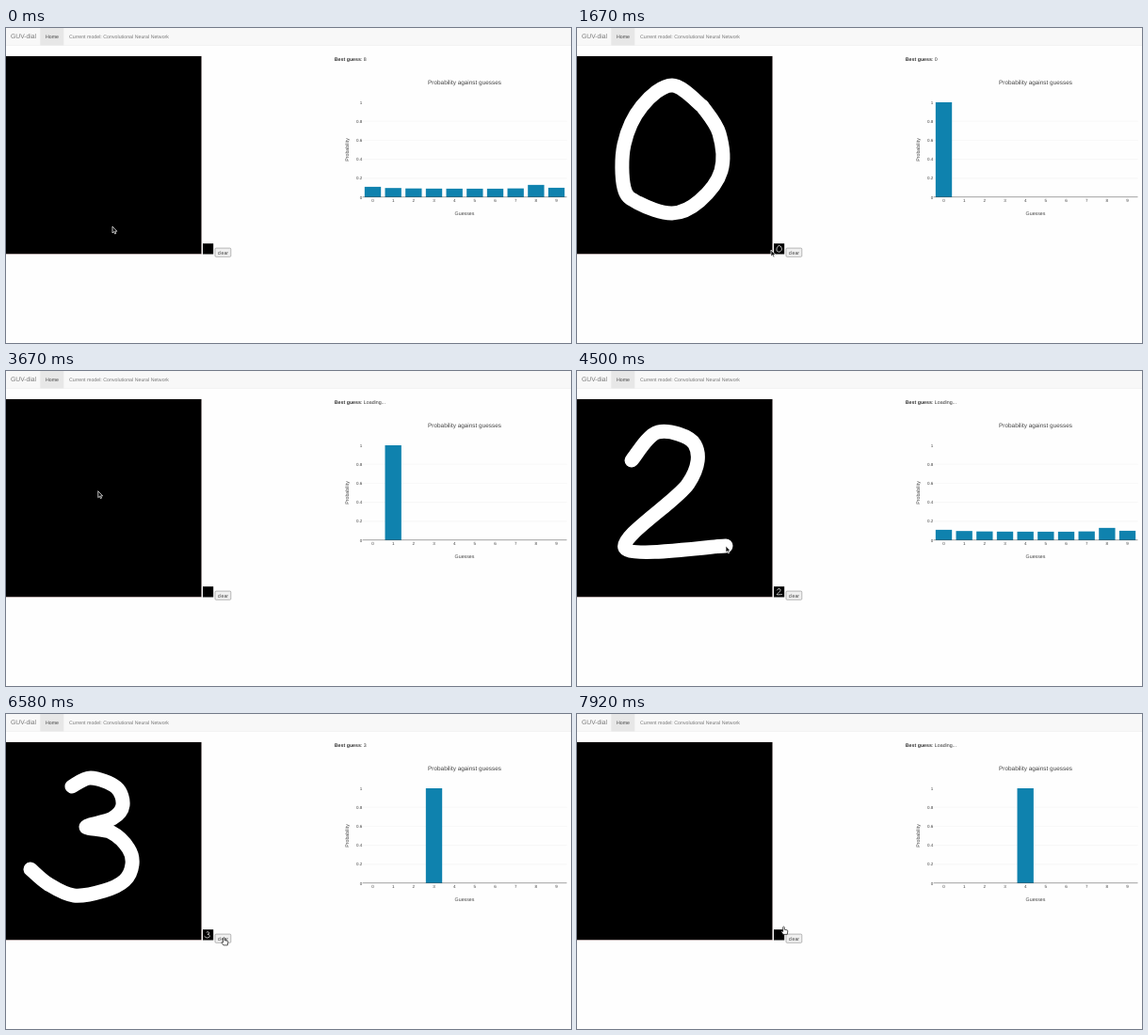
Write an HTML page that moves like this. It is 600x335 px and loops after 8000 ms.

```html
<!DOCTYPE html>
<html lang="en">
<head>
<meta charset="utf-8">
<title>Digit recogniser</title>
<style>
  html, body { margin: 0; width: 100%; height: 100%; overflow: hidden; background: #fefefe; }
  svg { display: block; width: 100vw; height: 100vh; }
  text { font-family: "Liberation Sans", Arial, sans-serif; font-size: 5.27px; fill: #444; text-rendering: geometricPrecision; }
  .nav { fill: #777; }
  .brand { font-size: 6.77px; }
  .guess { fill: #333; }
  .guess tspan { font-weight: bold; }
  .guess #answer { font-weight: normal; }
  .title { font-size: 6.4px; }
  .tick { font-size: 4.5px; }
  .mid { text-anchor: middle; }
  .end { text-anchor: end; }
  .bar { fill: #0f82ae; }
  .grid { stroke: #eee; stroke-width: .5; }
  #ink { fill: none; stroke: #fff; stroke-width: 15; stroke-linecap: round; stroke-linejoin: round; }
  #button { fill: #f0f0f0; stroke: #767676; stroke-width: .5; }
  #arrow { fill: #111; stroke: #fff; stroke-width: .7; }
  #hand { fill: #fff; stroke: #111; stroke-width: .7; stroke-linejoin: round; }
</style>
</head>
<body>
<svg viewBox="0 0 600 335" preserveAspectRatio="none">
  <rect width="600" height="18.5" fill="#f8f8f8"/>
  <rect y="18.5" width="600" height=".4" fill="#e7e7e7"/>
  <rect x="36.3" width="25" height="18.5" fill="#e7e7e7"/>
  <text class="nav brand" x="5" y="11.4">GUV-dial</text>
  <text x="42" y="11" fill="#555">Home</text>
  <text class="nav" x="67" y="11">Current model: Convolutional Neural Network</text>

  <rect y="29.7" width="207.8" height="211.2" fill="#cdbcbc"/>
  <rect y="30" width="207.4" height="210.1"/>
  <rect x="209" y="229.2" width="11.2" height="11.3"/>
  <g id="ink"></g>
  <use href="#ink" transform="translate(209.5 229.8) scale(.05) translate(3 -30)"/>
  <rect id="button" x="222" y="234.1" width="16.8" height="9.2" rx="1"/>
  <text class="mid" x="230.4" y="240.6" fill="#222">clear</text>

  <text class="guess" x="348.8" y="35.4"><tspan>Best guess</tspan>: <tspan id="answer"></tspan></text>
  <text class="mid title" x="487" y="60">Probability against guesses</text>
  <text class="mid" x="487" y="199.1">Guesses</text>
  <text class="mid" transform="translate(364.3 129.5) rotate(-90)">Probability</text>
  <g id="chart"></g>
  <rect x="378.7" y="179.6" width="216.8" height=".5" fill="#444"/>

  <g id="cursor">
    <path id="arrow" d="M0 0V7L1.6 5.6L2.7 8L3.8 7.5L2.8 5.2H4.9Z"/>
    <path id="hand" d="M-.8 .7Q0-.4 .8 .7V3.2L3.6 3.8Q4.4 4 4.3 5L3.8 8.4H-.6L-2.6 5.6Q-2.6 4.4-.8 5.4Z"/>
  </g>
</svg>
<script>
const FPS = 12, STEPS = 96;
const BASE = 180, UNIT = 101;
const BUTTON = { x: 231.5, y: 237.5 };

// Times are in steps of 1/12 s; strokes are key points of a smooth curve.
const digits = [
  { start: 4, end: 17, wipe: 24, strokes: ['133,83 101,61 69,83 50,124 50,170 65,186 101,197 130,184 153,152 151,112 133,83'] },
  { start: 31.2, end: 35, wipe: 40, strokes: ['121,61 98,195'] },
  { start: 45.8, end: 54, wipe: 60, strokes: ['58,95 86,65 125,78 118,120 51,188 158,186'] },
  { start: 63.6, end: 74, wipe: 80, strokes: ['70,77 90,68 117,78 124,97 113,111 85,120 112,126 130,143 134,160 126,177 104,188 72,193 45,181 26,165'] },
  { start: 82, end: 87, wipe: 93, strokes: ['102,62 51,148 152,146', '112,105 108,200'] }
];

const $ = id => document.getElementById(id);
function add(parent, tag, attrs, text) {
  const el = document.createElementNS('http://www.w3.org/2000/svg', tag);
  for (const key in attrs) el.setAttribute(key, attrs[key]);
  if (text !== undefined) el.textContent = text;
  return parent.appendChild(el);
}

// Catmull-Rom curve through the points
function smoothPath(points) {
  const pts = points.split(' ').map(p => p.split(',').map(Number));
  const at = i => pts[Math.max(0, Math.min(pts.length - 1, i))];
  const handle = (i, sign) => at(i).map((v, axis) => v + sign * (at(i + 1)[axis] - at(i - 1)[axis]) / 6);
  return pts.slice(1).reduce(
    (d, p, i) => `${d}C${handle(i, 1)} ${handle(i + 1, -1)} ${p}`, `M${pts[0]}`);
}

// An empty board is read as an unsure 8.
const idle = i => .09 + .02 * Math.exp(-i) + .042 * Math.exp(-2 * (i - 8.15) ** 2);
const sureOf = digit => i => +(i === digit);

const chart = $('chart');
for (let i = 0; i <= 5; i++) {
  const y = BASE - UNIT * i / 5;
  if (i > 0 && i < 5) add(chart, 'path', { class: 'grid', d: `M378.7 ${y}H595.5` });
  add(chart, 'text', { class: 'tick end', x: 378.2, y: y + 1.5 }, i / 5);
}
const bars = Array.from({ length: 10 }, (_, i) => {
  const x = 389.5 + 21.67 * i;
  add(chart, 'text', { class: 'tick mid', x, y: 184.7 }, i);
  return add(chart, 'rect', { class: 'bar', x: x - 8.67, width: 17.34 });
});

const events = [{ at: 0, text: '8', chance: idle }];
const stops = [{ at: 0, x: 113, y: 211 }, { at: 20, x: 206, y: 236 }, { at: STEPS - 1, x: 219.5, y: 226 }];
const strokes = [];
digits.forEach(({ start, end, wipe, strokes: curves }, k) => {
  const next = digits[k + 1]?.start ?? STEPS + 1;
  events.push(
    { at: end, text: 'Loading...', chance: idle },
    { at: end + 2, text: k, chance: sureOf(k) },
    { at: wipe, text: 'Loading...', chance: sureOf(k) },
    { at: next - 1, text: '8', chance: idle });
  curves.forEach((points, i) => {
    const slot = (end - start) / curves.length;
    const from = start + i * slot;
    const to = from + slot - (i < curves.length - 1 ? .5 : 0);
    const el = add($('ink'), 'path', { d: smoothPath(points), pathLength: 1 });
    const length = el.getTotalLength();
    const pen = p => {
      const { x, y } = el.getPointAtLength(p * length);
      return { x, y };
    };
    strokes.push({ el, from, to, wipe, pen });
    stops.push({ at: from, ...pen(0) }, { at: to, ...pen(1) });
  });
  stops.push({ at: wipe - 2, ...BUTTON }, { at: wipe, ...BUTTON });
});
stops.sort((a, b) => a.at - b.at);

function pointer(n) {
  const active = strokes.find(s => n >= s.from && n <= s.to);
  if (active) return active.pen((n - active.from) / (active.to - active.from));
  const next = stops.findIndex(s => s.at > n);
  if (next < 0) return stops.at(-1);
  const a = stops[next - 1], b = stops[next];
  const p = (n - a.at) / (b.at - a.at), e = p * p * (3 - 2 * p);
  return { x: a.x + (b.x - a.x) * e, y: a.y + (b.y - a.y) * e };
}

function draw(n) {
  const { text, chance } = events.findLast(e => e.at <= n);
  $('answer').textContent = text;
  bars.forEach((bar, i) => {
    const height = UNIT * chance(i);
    bar.setAttribute('y', BASE - height);
    bar.setAttribute('height', height);
  });
  for (const { el, from, to, wipe } of strokes) {
    const p = Math.min(1, (n - from) / (to - from));
    el.style.display = p > 0 && n < wipe ? '' : 'none';
    el.setAttribute('stroke-dasharray', p < 1 ? `${Math.max(p, 0)} 2` : 'none');
  }
  const { x, y } = pointer(n);
  const hover = x > 214 && x < 240 && y > 224 && y < 245;
  $('cursor').setAttribute('transform', `translate(${x} ${y})`);
  $('arrow').style.display = hover ? 'none' : '';
  $('hand').style.display = hover ? '' : 'none';
}

const begin = performance.now();
function tick() {
  const ms = performance.now() - begin;
  draw(Math.floor((ms + 4) * FPS / 1000) % STEPS);
  requestAnimationFrame(tick);
}
tick();
</script>
</body>
</html>
```
